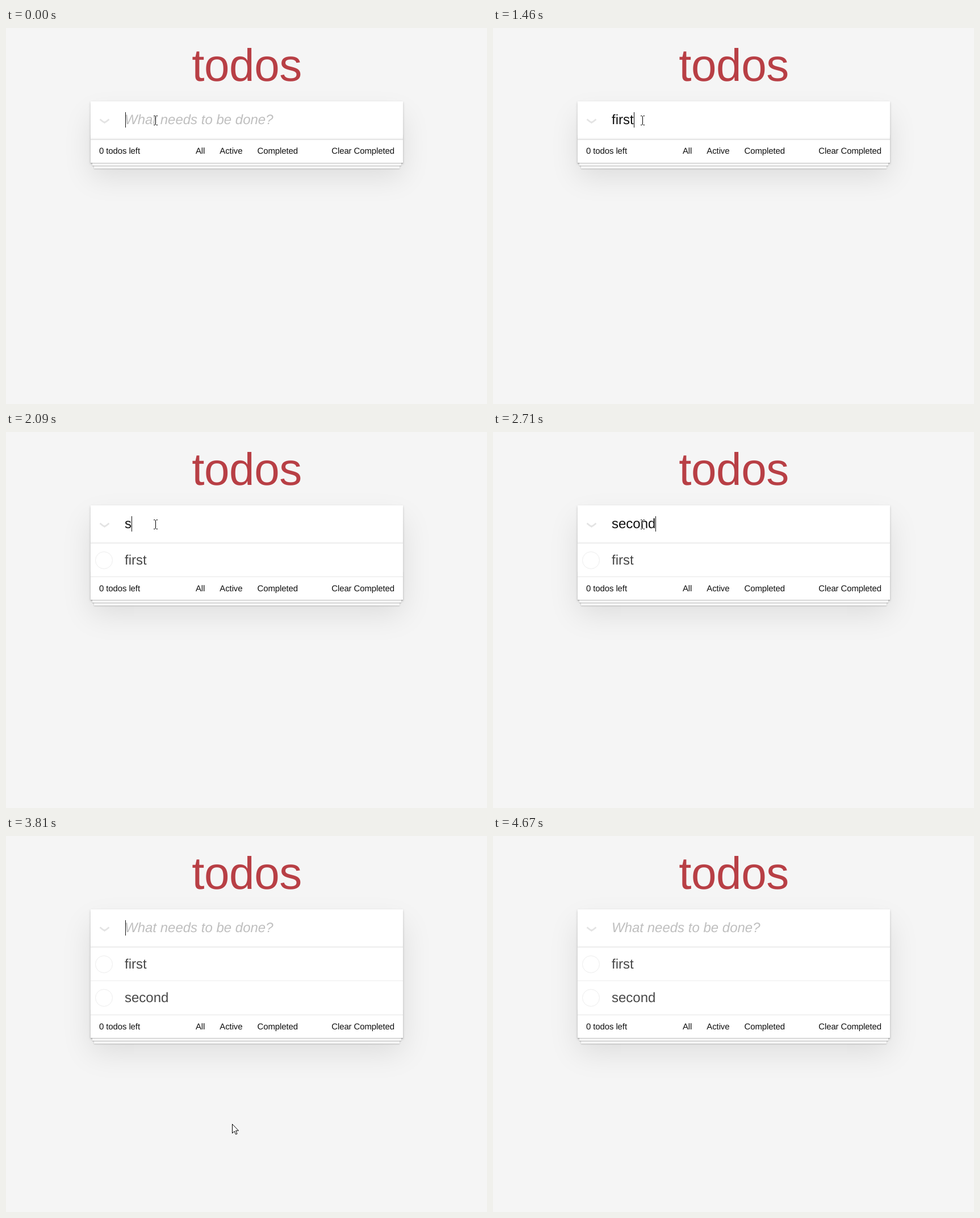
An HTML page for the animation above (4750 ms loop, 847 px wide and 661 px high).

```html
<!DOCTYPE html>
<html lang="en">
<head>
<meta charset="utf-8">
<title>todos</title>
<style>
html, body { margin: 0; width: 100%; height: 100%; overflow: hidden; background: #f5f5f5; }
body {
  position: relative; color: #111;
  font: 14px/19.6px "Liberation Sans", Arial, sans-serif;
  text-rendering: geometricPrecision;
}
h1 {
  position: absolute; left: 149px; top: 21px; width: 550px; margin: 0;
  font-size: 80px; font-weight: 400; line-height: 89px; letter-spacing: -.4px;
  text-align: center; color: #b83f45;
}
ul { margin: 0; padding: 0; list-style: none; }
.app {
  position: absolute; left: 149px; top: 129px; width: 550px; background: #fff;
  box-shadow: 0 2px 4px rgba(0,0,0,.2), 0 25px 50px rgba(0,0,0,.1);
}
.entry {
  position: relative; height: 33.6px; padding: 16px 16px 16px 60px;
  font-size: 24px; line-height: 33.6px; white-space: pre;
  box-shadow: inset 0 -2px 1px rgba(0,0,0,.03);
}
.hint { color: #bfbfbf; font-style: italic; }
.caret { position: absolute; top: 19px; width: 1px; height: 27px; background: #111; }
.chevron { position: absolute; left: 15px; top: 29px; }
.main { position: relative; z-index: 2; border-top: 1px solid #e6e6e6; }
.main li {
  position: relative; padding: 16px 15px 14px 60px; border-bottom: 1px solid #ededed;
  font-size: 24px; line-height: 28.8px; color: #484848;
}
.main li.last { border-bottom: 0; }
.main li::before {
  content: ""; position: absolute; left: 8px; top: 14px; width: 29px; height: 29px;
  border: 1px solid #ededed; border-radius: 50%;
}
.footer {
  position: relative; height: 19.4px; padding: 10.6px 15px 10px; border-top: 1px solid #e6e6e6;
  font-size: 15px; letter-spacing: -.12px; text-align: center;
}
.footer::before {
  content: ""; position: absolute; left: 0; right: 0; bottom: 0; height: 50px;
  box-shadow: 0 1px 1px rgba(0,0,0,.2), 0 8px 0 -3px #f6f6f6, 0 9px 1px -3px rgba(0,0,0,.2),
    0 16px 0 -6px #f6f6f6, 0 17px 2px -6px rgba(0,0,0,.2);
}
.count { float: left; }
.clear { float: right; }
.filters { position: absolute; left: 0; right: 0; }
.filters li { display: inline; margin: 3px; padding: 3px 8px; }
.pointer { position: absolute; left: 0; top: 0; z-index: 3; overflow: visible; }
#beam { mix-blend-mode: difference; }
</style>
</head>
<body>
<h1>todos</h1>
<div class="app">
  <div class="entry"><svg class="chevron" width="20" height="12"><path d="M1.5 2.5Q5.5 6 9.5 8.3Q13.5 6 17.5 2.5" fill="none" stroke="#e3e3e3" stroke-width="2.8"/></svg><span id="typed"></span><span id="hint" class="hint">What needs to be done?</span><i id="caret" class="caret"></i></div>
  <div class="main"><ul><li id="first">first</li><li id="second" class="last">second</li></ul></div>
  <div class="footer">
    <span class="count">0 todos left</span>
    <ul class="filters"><li>All</li> <li>Active</li> <li>Completed</li></ul>
    <span class="clear">Clear Completed</span>
  </div>
</div>
<svg id="beam" class="pointer" width="8" height="17"><path d="M0 .5H2.5M4.5 .5H7M3.5 1V16M0 16.5H2.5M4.5 16.5H7" stroke="#fff" fill="none"/></svg>
<svg id="arrow" class="pointer" width="13" height="20"><path d="M.5 .5V16.5L4.2 13L6.6 18.5L9 17.5L6.6 12H11.5Z" fill="#fff" stroke="#000"/></svg>
<script>
const LOOP = 4750;
const $ = id => document.getElementById(id);
const show = (el, on) => { el.style.display = on ? "" : "none"; };

// [start time, value]; each value holds until the next start
const typing = [
  [0, ""], [990, "f"], [1150, "fi"], [1230, "fir"], [1390, "firs"], [1460, "first"], [1620, ""],
  [2090, "s"], [2240, "sec"], [2400, "seco"], [2560, "secon"], [2710, "second"], [2950, ""]
];
const blink = [
  [0, 1], [290, 0], [840, 1], [1930, 0], [2090, 1],
  [2950, 0], [3500, 1], [4040, 0], [4590, 1], [4670, 0]
];
const path = [
  [0, [264, 162]], [3650, [290, 230]], [3730, [345, 375]], [3810, [398, 507]],
  [3890, [475, 570]], [3970, [565, 620]], [4040, [663, 652]], [4120, [760, 700]]
];
const at = (track, t) => track.findLast(([start]) => start <= t)[1];

function render(t) {
  const text = at(typing, t);
  $("typed").textContent = text;
  show($("hint"), !text);
  show($("caret"), at(blink, t));
  $("caret").style.left = 60 + (text ? $("typed").offsetWidth : 1) + "px";

  show($("first"), t >= 1620);
  show($("second"), t >= 2950);
  $("first").className = t < 2950 ? "last" : "";

  const [x, y] = at(path, t);
  const overInput = y < 195;
  show($("beam"), overInput);
  show($("arrow"), !overInput);
  $("beam").style.transform = `translate(${x - 4}px, ${y - 8}px)`;
  $("arrow").style.transform = `translate(${x}px, ${y - 1}px)`;
}

const begin = performance.now();
function tick() {
  render((performance.now() - begin) % LOOP);
  requestAnimationFrame(tick);
}
tick();
</script>
</body>
</html>
```
